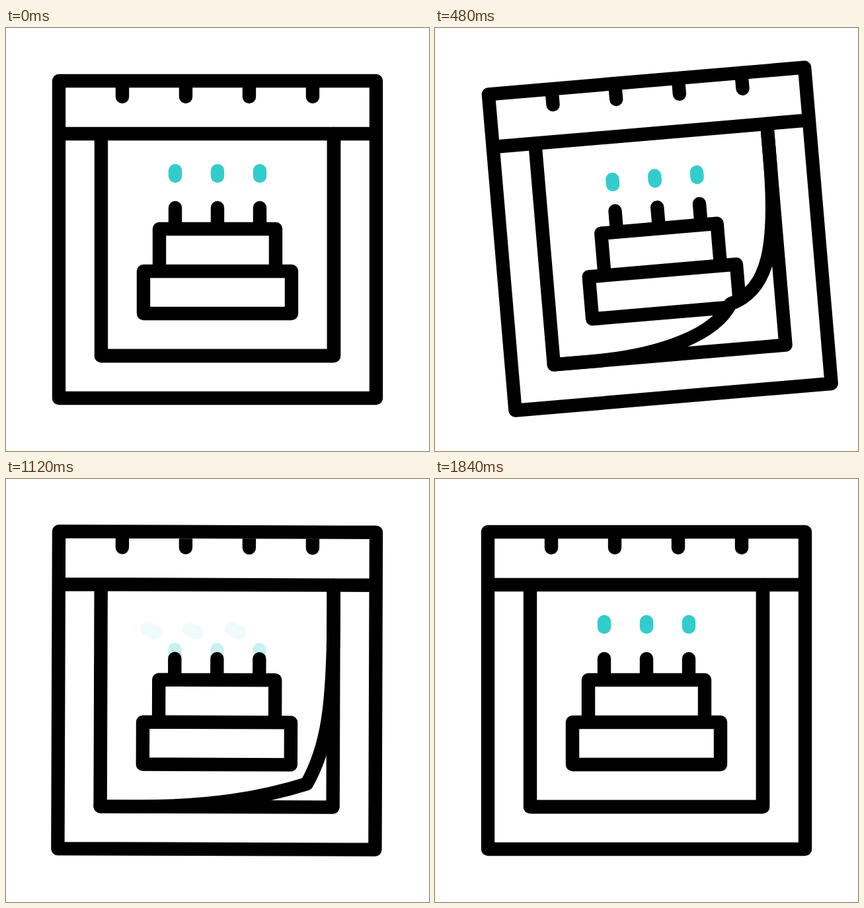
These frames come from a looping animation (640 by 640 pixels, 2000 ms). An HTML page:

```html
<!DOCTYPE html>
<html lang="en">
<head>
<meta charset="utf-8">
<title>Birthday calendar</title>
<style>
  html, body { margin: 0; width: 100%; height: 100%; overflow: hidden; background: #fff; }
  svg { display: block; width: 100vw; height: 100vh; }
  .ink { fill: none; stroke: #000; stroke-width: 20.4; stroke-linecap: round; stroke-linejoin: round; }
  .flame { stroke: #3cc; stroke-width: 20.4; stroke-linecap: round; }
</style>
</head>
<body>
<svg viewBox="0 0 640 640">
  <g id="board">
    <g id="blown"></g>
    <g id="lit"></g>
    <path class="ink" d="M256 272V304M320 272V304M384 272V304M232 368V304H408V368M208 368H432V432H208Z"/>
    <path id="under" fill="#fff"/>
    <path id="curl" class="ink"/>
    <path class="ink" d="M80 80H560V560H80ZM80 160H560M144 160V496H496V160M176 80V104M272 80V104M368 80V104M464 80V104"/>
  </g>
</svg>
<script>
const LOOP = 2000, STEP = 40;
const candles = [256, 320, 384];

// Each table holds [time, value] pairs, eased in between.
const swing = [[0, 0], [448, -5], [843, 3], [1277, -1], [1832, 0]];
const lift = [[65, 0], [474, 1], [800, 1], [1440, .02], [1840, 0]];
const sink = [[0, 220], [200, 228]];
const blow = [[725, 0], [1195, 1]];
const spin = [[680, 0], [1200, 120]];
const rise = [[980, 274], [1400, 228], [1840, 220]];
const glow = [[980, 0], [1400, 1]];

const $ = id => document.getElementById(id);
const mix = (a, b, p) => a + (b - a) * p;

function at(keys, t) {
  if (t <= keys[0][0]) return keys[0][1];
  for (let i = 1; i < keys.length; i++) {
    const [t0, a] = keys[i - 1], [t1, b] = keys[i];
    if (t < t1) {
      const x = (t - t0) / (t1 - t0);
      return mix(a, b, x * x * (3 - 2 * x));
    }
  }
  return keys[keys.length - 1][1];
}

function addFlames(group) {
  return candles.map(() => {
    const line = document.createElementNS("http://www.w3.org/2000/svg", "line");
    line.setAttribute("class", "flame");
    group.append(line);
    return line;
  });
}

function placeFlames(lines, dx, y, half, angle) {
  lines.forEach((line, i) => {
    line.setAttribute("y1", -half);
    line.setAttribute("y2", half);
    line.setAttribute("transform", `translate(${candles[i] + dx} ${y}) rotate(${angle})`);
  });
}

// Page edge: down the right side to the lifted corner, then along the bottom.
function pageEdge(p) {
  const x = mix(496, 418, p), y = mix(496, 427, p);
  const side = [x + 60 * p, y - mix(95, 16, p)];
  const base = [x - mix(115, 26, p), y + 43 * p];
  return `M496 160V210C496 345 ${side} ${x} ${y}C${base} 310 496 200 496H144`;
}

const blown = addFlames($("blown")), lit = addFlames($("lit"));

function draw(t) {
  $("board").setAttribute("transform", `rotate(${at(swing, t)} 320 80)`);

  const edge = pageEdge(at(lift, t));
  $("curl").setAttribute("d", edge);
  $("under").setAttribute("d", edge + "V496H496Z");

  const b = at(blow, t);
  $("blown").setAttribute("opacity", 1 - b);
  placeFlames(blown, -39 * b, at(sink, t) + 2 * b, mix(4, 6.7, b), at(spin, t));

  $("lit").setAttribute("opacity", at(glow, t));
  placeFlames(lit, 0, at(rise, t), 4, 0);
}

const start = performance.now();
function tick() {
  const t = (performance.now() - start) % LOOP;
  draw(Math.floor(t / STEP) * STEP);
  requestAnimationFrame(tick);
}
tick();
</script>
</body>
</html>
```
